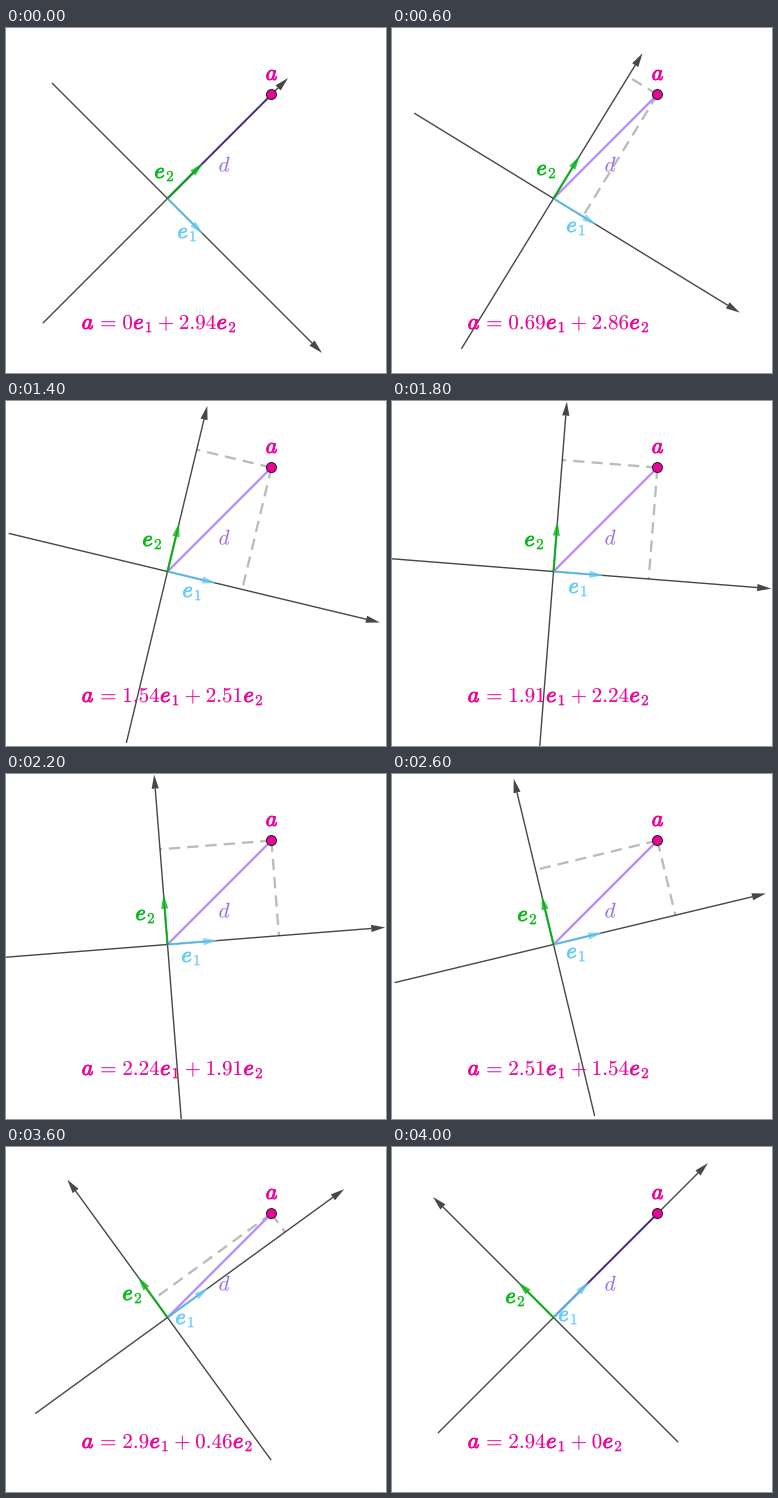
Animation, 380 px wide and 345 px high, one loop 4200 ms. Source, as a matplotlib script:

```python
import numpy as np
import matplotlib.pyplot as plt
from matplotlib.animation import FuncAnimation
from matplotlib.patches import Circle, PathPatch, Polygon
from matplotlib.textpath import TextPath
from matplotlib.transforms import Affine2D

plt.rcParams["mathtext.fontset"] = "cm"

W, H, DPI = 380, 345, 100
PX = 72 / DPI                      # points per pixel
FRAMES, INTERVAL = 21, 200
UNIT, EM = 50, 21
ORIGIN = np.array([161.5, 170.5])
LENGTH = 2.94
POINT = ORIGIN + LENGTH * UNIT * np.array([1, -1]) / np.sqrt(2)

PINK, GREEN, BLUE = "#ea0498", "#06b815", "#66ccfa"
PURPLE, LABEL_PURPLE, GRAY = "#b88cff", "#9e70ec", "#bbbbbb"

# Advance widths in em; each glyph is centred in its advance.
ADVANCE = {"a": 0.633, "e": 0.54, "d": 0.52, "=": 1.334, "+": 1.222, ".": 0.278}

fig = plt.figure(figsize=(W / DPI, H / DPI), dpi=DPI, facecolor="white")
ax = fig.add_axes([0, 0, 1, 1])


def draw_glyph(char, x, y, advance, size, color, weight, z=9):
    path = TextPath((0, 0), f"${char}$", size=size)
    box = path.get_extents()
    left = x + (advance - box.width) / 2 - box.x0
    place = Affine2D().scale(1, -1).translate(left, y)
    ax.add_patch(PathPatch(place.transform_path(path), facecolor=color,
                           edgecolor=color, lw=weight * PX, zorder=z))


def draw_math(text, x, y, color):
    """Typeset letters a and e in bold, with a digit after e as a subscript."""
    previous = ""
    for char in text:
        if previous == "e":
            advance = 0.43 * EM
            draw_glyph(rf"\mathbf{{{char}}}", x, y + 0.15 * EM, advance,
                       0.72 * EM, color, 0.35)
        else:
            advance = ADVANCE.get(char, 0.5) * EM
            bold = char in "ae"
            draw_glyph(char, x, y, advance, EM * (1.06 if bold else 1),
                       color, 0.95 if bold else 0.1)
        x += advance
        previous = char


def draw_line(start, end, color, width, z, **style):
    ax.plot(*zip(start, end), color=color, lw=width * PX, zorder=z,
            solid_capstyle="butt", dash_capstyle="butt", **style)


def draw_arrow(start, tip, color, width, alpha, z, head=14, half=3.6):
    along = (tip - start) / np.hypot(*(tip - start))
    side = half * np.array([-along[1], along[0]])
    base = tip - head * along
    draw_line(start, base, color, width, z, alpha=alpha)
    ax.add_patch(Polygon([tip, base + side, base - side], facecolor=color,
                         lw=0, alpha=alpha, zorder=z))


def number(value):
    return f"{abs(round(value, 2)):g}"


def draw(frame):
    ax.cla()
    ax.set(xlim=(0, W), ylim=(H, 0))
    ax.axis("off")

    angle = np.radians(-45 + 4.5 * frame)
    sin, cos = np.sin(angle), np.cos(angle)
    e1 = np.array([cos, -sin])
    e2 = np.array([-sin, -cos])
    first = LENGTH * np.cos(np.pi / 4 - angle)
    second = LENGTH * np.sin(np.pi / 4 - angle)

    for foot in (ORIGIN + first * UNIT * e1, ORIGIN + second * UNIT * e2):
        draw_line(POINT, foot, GRAY, 2.3, 1,
                  linestyle=(0, (11.3 / 2.3, 7 / 2.3)))
    draw_line(ORIGIN, POINT, PURPLE, 2.3, 2)

    draw_arrow(ORIGIN - 163.4 * e1, ORIGIN + 218.4 * e1, "black", 1.4, 0.72, 3)
    draw_arrow(ORIGIN - 176.3 * e2, ORIGIN + 170.4 * e2, "black", 1.4, 0.72, 3)
    draw_arrow(ORIGIN, ORIGIN + UNIT * e1, BLUE, 2.3, 0.8, 4)
    draw_arrow(ORIGIN, ORIGIN + UNIT * e2, GREEN, 2.3, 0.8, 5)
    ax.add_patch(Circle(POINT, 5, facecolor=PINK, edgecolor="#222222",
                        lw=PX, zorder=6))

    x1, y1 = ORIGIN + UNIT / 2 * e1 + (-11 - 3.7 * sin, 19.5 + 4 * sin**2)
    x2, y2 = ORIGIN + UNIT / 2 * e2 + (-31, 0.2 + 4.3 * sin)
    draw_math("e1", round(x1), round(y1), BLUE)
    draw_math("e2", round(x2), round(y2), GREEN)
    draw_math("a", 259, 52, PINK)
    draw_math("d", 213, 143.5, LABEL_PURPLE)
    draw_math(f"a={number(first)}e1+{number(second)}e2", 75, 301, PINK)
    return []


anim = FuncAnimation(fig, draw, frames=FRAMES, interval=INTERVAL,
                     init_func=lambda: [], repeat=True, repeat_delay=0)
plt.show()
```
